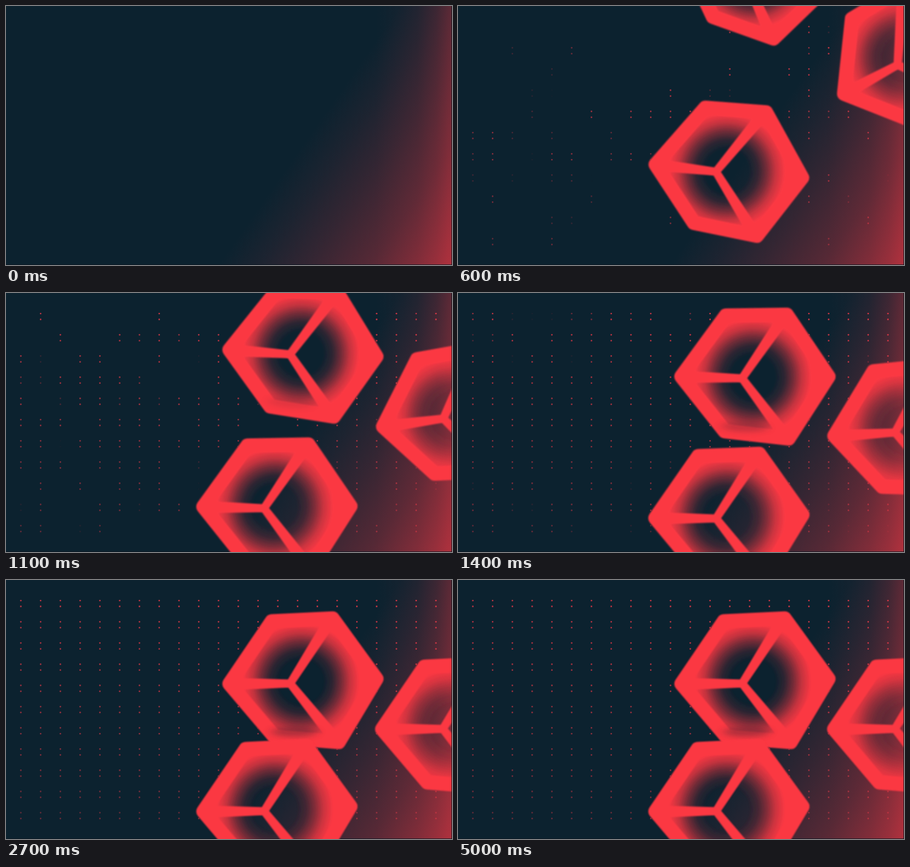
An HTML page that plays this animation: 736x428 px, repeating every 5.1 s.

```html
<!DOCTYPE html>
<html lang="en">
<head>
<meta charset="utf-8">
<title>Falling cubes</title>
<style>
html, body { margin: 0; width: 100%; height: 100%; overflow: hidden; background: #0c222f; }
svg { display: block; width: 100%; height: 100%; }
</style>
</head>
<body>
<svg viewBox="0 0 736 428" preserveAspectRatio="none">
  <defs>
    <linearGradient id="glow" gradientUnits="userSpaceOnUse" x1="650" y1="0" x2="908" y2="181">
      <stop offset="0" stop-color="#fa3844" stop-opacity="0"/>
      <stop offset=".18" stop-color="#fa3844" stop-opacity=".07"/>
      <stop offset=".39" stop-color="#fa3844" stop-opacity=".17"/>
      <stop offset=".65" stop-color="#fa3844" stop-opacity=".31"/>
      <stop offset="1" stop-color="#fa3844" stop-opacity=".57"/>
    </linearGradient>
    <linearGradient id="side" gradientUnits="userSpaceOnUse" x1="610" y1="0" x2="736" y2="0">
      <stop offset="0" stop-color="#fa3844" stop-opacity="0"/>
      <stop offset=".55" stop-color="#fa3844" stop-opacity=".06"/>
      <stop offset=".8" stop-color="#fa3844" stop-opacity=".15"/>
      <stop offset="1" stop-color="#fa3844" stop-opacity=".28"/>
    </linearGradient>
    <radialGradient id="core" gradientUnits="userSpaceOnUse" cx="-3" cy="1" r="100">
      <stop offset=".36" stop-color="#fb3843" stop-opacity="0"/>
      <stop offset=".52" stop-color="#fb3843" stop-opacity=".14"/>
      <stop offset=".66" stop-color="#fb3843" stop-opacity=".42"/>
      <stop offset=".8" stop-color="#fb3843" stop-opacity=".76"/>
      <stop offset=".96" stop-color="#fb3843"/>
    </radialGradient>
    <filter id="soft" x="-10%" y="-10%" width="120%" height="120%"><feGaussianBlur stdDeviation="1.3"/></filter>
    <filter id="shade" x="-50%" y="-100%" width="200%" height="300%"><feGaussianBlur stdDeviation="8 5"/></filter>
    <path id="hex" stroke-width="24" stroke-linejoin="round"/>
    <path id="arms" fill="#fb3843"/>
    <g id="cube" filter="url(#soft)">
      <use href="#hex" fill="url(#core)" stroke="#fb3843"/>
      <use href="#arms"/>
    </g>
    <mask id="gaps" maskUnits="userSpaceOnUse" x="0" y="0" width="736" height="428">
      <path d="M0 0H736V428H0Z" fill="#fff"/>
      <g id="holes"/>
    </mask>
  </defs>
  <path d="M0 0H736V428H0Z" fill="#0c222f"/>
  <path d="M0 0H736V428H0Z" fill="url(#glow)"/>
  <path d="M0 0H736V428H0Z" fill="url(#side)"/>
  <path d="M0 427H736V428H0Z" fill="#0a1420" opacity=".75"/>
  <g id="dots" mask="url(#gaps)" stroke="#f23c4a" stroke-width="2.7" stroke-linecap="round"/>
  <g id="cubes"/>
  <path d="M735 0H736V428H735Z" fill="#0a1018" opacity=".75"/>
</svg>
<script>
const LOOP = 5100, STEP = 100, COLS = 22, ROWS = 11;
const corners = [[-133, 5], [-57, -109], [54, -114], [133, -4], [65, 111], [-52, 103]];
const hub = [-21, 4];

// Resting place, fall distance, time constant, cut-off and turn per pixel.
const cubes = [
  { x: 490, y: 167, fall: 876, tau: 462, tail: 13, turn: .067, shade: true },
  { x: 447, y: 378, fall: 515, tau: 390, tail: 5, turn: .067 },
  { x: 742, y: 242, fall: 742, tau: 396, tail: 5, turn: -.178 }
];

const $ = id => document.getElementById(id);
const clamp = v => Math.min(1, Math.max(0, v));

function add(parent, tag, attrs) {
  const el = document.createElementNS('http://www.w3.org/2000/svg', tag);
  for (const key in attrs) el.setAttribute(key, attrs[key]);
  return parent.appendChild(el);
}

function polygon(points) {
  return 'M' + points.map(p => p.map(v => v.toFixed(1)).join(' ')).join('L') + 'Z';
}

// A bar from the hub to a corner that widens outwards.
function arm([x, y]) {
  const dx = x - hub[0], dy = y - hub[1], len = Math.hypot(dx, dy);
  const nx = -dy / len, ny = dx / len;
  const at = (k, w) => [hub[0] + dx * k + nx * w, hub[1] + dy * k + ny * w];
  return polygon([at(-.03, 6.5), at(.82, 10), at(.82, -10), at(-.03, -6.5)]);
}

$('hex').setAttribute('d', polygon(corners.map(([x, y]) => {
  const k = 1 - 12 / Math.hypot(x, y);
  return [x * k, y * k];
})));
$('arms').setAttribute('d', [0, 2, 4].map(i => arm(corners[i])).join(''));

for (const c of cubes) {
  c.hole = add($('holes'), 'use', { href: '#hex', fill: '#000', stroke: '#000' });
  c.body = add($('cubes'), 'g', {});
  add(c.body, 'use', { href: '#cube' });
  if (c.shade) {
    c.dim = add(c.body, 'ellipse', {
      cx: -14, cy: 84, rx: 38, ry: 8, fill: '#3a2030', filter: 'url(#shade)'
    });
  }
}

const dots = [];
for (let r = 0; r < ROWS; r++) {
  for (let c = 0; c < COLS; c++) {
    const seed = Math.sin(c * 12.9898 + r * 78.233 + 1) * 43758.5453;
    const h = seed - Math.floor(seed);
    const edge = Math.abs(r - 5) / 5 * (c < 17 ? 1 : .5);
    const x = 24.5 + c * 32.62, y = 34 + r * 35.05;
    dots.push({
      el: add($('dots'), 'path', { d: `M${x} ${y}h.01M${x} ${y + 9.7}h.01` }),
      start: 150 + 1500 * Math.pow(h, 1.2 - .65 * edge) * (.7 + .3 * edge),
      level: .74 - .036 * r + .1 * c / COLS
    });
  }
}

function draw(t) {
  for (const c of cubes) {
    const off = Math.max(0, c.fall * Math.exp(-t / c.tau) - c.tail);
    const place = `translate(${c.x} ${c.y - off}) rotate(${off * c.turn})`;
    c.body.setAttribute('transform', place);
    c.hole.setAttribute('transform', place);
    if (c.dim) c.dim.setAttribute('opacity', .4 * clamp(1 - off / 100));
  }
  for (const d of dots) {
    d.el.setAttribute('opacity', d.level * clamp((t - d.start) / 220));
  }
}

const begin = performance.now();
let shown = -1;
function tick() {
  const time = Math.max(0, performance.now() - begin) % LOOP;
  const t = Math.floor(time / STEP) * STEP;
  if (t !== shown) draw(shown = t);
  requestAnimationFrame(tick);
}
tick();
</script>
</body>
</html>
```
